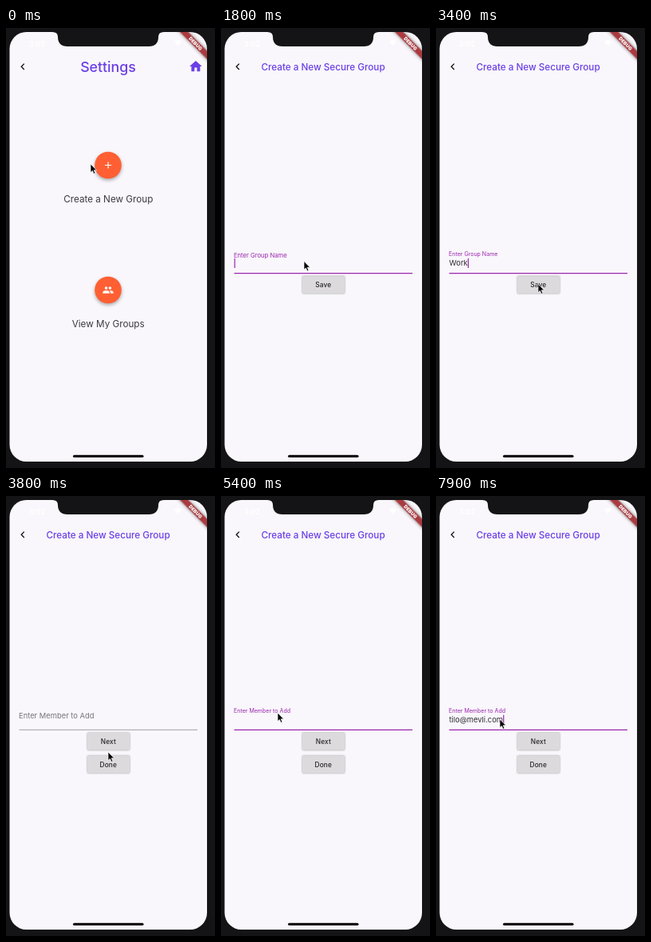
An HTML page that plays this animation: 262x550 px, repeating every 8 s.

```html
<!DOCTYPE html>
<html lang="en">
<head>
<meta charset="utf-8">
<title>Create a group</title>
<style>
html, body { margin: 0; width: 100%; height: 100%; overflow: hidden; background: #141315; }
svg { display: block; width: 100vw; height: 100vh; font-family: Inter, Roboto, sans-serif; }
text { white-space: pre; }
.mid { text-anchor: middle; }
.title { fill: #6b3fe6; font-weight: 500; }
.big { font-size: 17.8px; }
.small { font-size: 11.7px; }
.item { fill: #3d3b41; font-size: 11.7px; }
.label, .typed { font-size: 9.4px; }
.typed { fill: #2e2c31; }
.btn rect { fill: #dcdadd; filter: drop-shadow(0 .9px .8px #0006); }
.btn text { fill: #252428; font-size: 8.3px; font-weight: 500; letter-spacing: .15px; }
.fab { fill: #ff5f33; filter: drop-shadow(0 2px 2px #0005); }
.ribbon { filter: drop-shadow(0 0 2px #0008); }
</style>
</head>
<body>
<svg viewBox="0 0 262 550" preserveAspectRatio="none">
  <defs>
    <clipPath id="screen"><rect x="4.5" y="5" width="247.5" height="537" rx="21"/></clipPath>
  </defs>
  <rect width="262" height="550" fill="#141315"/>
  <g clip-path="url(#screen)">
    <rect width="262" height="550" fill="#f9f7fb"/>
    <text x="29" y="22.5" font-size="9" font-weight="600" fill="#fff">3:02</text>
    <path d="M211 17q4.500-4 9 0l-4.500 5z" fill="#fff"/>

    <g id="home">
      <text class="mid title big" x="128" y="55">Settings</text>
      <path fill="#6b3fe6" transform="translate(228.500 38.700) scale(.78)" d="M10 20v-6h4v6h5v-8h3L12 3 2 12h3v8z"/>
      <circle class="fab" cx="128" cy="171.500" r="16.800"/>
      <circle id="splash" cx="128" cy="171.500" r="16.800" fill="#fff"/>
      <path d="M124 171.500h8.200M128.100 167.400v8.200" stroke="#fff" stroke-width="1.200"/>
      <text class="mid item" x="128.300" y="217.500">Create a New Group</text>
      <circle class="fab" cx="128" cy="327.500" r="16.800"/>
      <path fill="#fff" transform="translate(120.800 320.300) scale(.6)" d="M16 11a3 3 0 1 0 0-6 3 3 0 0 0 0 6zM8 11a3 3 0 1 0 0-6 3 3 0 0 0 0 6zm0 2c-2.330 0-7 1.170-7 3.500V19h14v-2.500c0-2.330-4.670-3.500-7-3.500zm8 0c-.3 0-.6 0-1 .05 1.160.84 2 2 2 3.450V19h6v-2.500c0-2.330-4.670-3.500-7-3.500z"/>
      <text class="mid item" x="128.200" y="373.500">View My Groups</text>
    </g>

    <text id="title" class="mid title small" x="128" y="52.500">Create a New Secure Group</text>
    <g id="group">
      <g class="btn"><rect x="102" y="310.300" width="53" height="21.500" rx="1.300"/><text class="mid" x="128.300" y="324">Save</text></g>
      <rect id="press" x="102" y="310.300" width="53" height="21.500" rx="1.300" fill="#000"/>
    </g>
    <g id="member">
      <g class="btn"><rect x="102" y="296" width="53" height="21.500" rx="1.300"/><text class="mid" x="128.300" y="309.700">Next</text></g>
      <g class="btn"><rect x="102" y="324.800" width="53" height="21.500" rx="1.300"/><text class="mid" x="128.300" y="338.500">Done</text></g>
    </g>

    <path d="M22.800 44.600l-3.600 3.700 3.600 3.700" fill="none" stroke="#111" stroke-width="1.300"/>
    <g transform="translate(237.600 19.400) rotate(45)">
      <rect class="ribbon" x="-30" y="-3.600" width="60" height="7.200" fill="#a93a3f"/>
      <text class="mid" y="2.200" font-size="6" font-weight="900" fill="#fff">DEBUG</text>
    </g>
  </g>
  <path d="M58 0v5q7 0 7 6q0 12 12 12h102q12 0 12-12q0-6 7-6V0z" fill="#141315"/>
  <rect x="84" y="533.800" width="88.500" height="3" rx="1.500" fill="#000"/>
  <path id="mouse" d="M0 0v10.600l2.400-2.200 1.700 3.900 1.800-.8-1.700-3.700h3.400z" fill="#000" stroke="#fff" stroke-width=".7"/>
</svg>
<script>
const LOOP = 8000, STEP = 100;
const PURPLE = '#9c27b0';
const $ = id => document.getElementById(id);
const clamp = v => Math.min(1, Math.max(0, v));
const mix = (a, b, p) => a + (b - a) * p;
const ease = p => p * p * (3 - 2 * p);

// time, x, y of the pointer tip
const path = [
  [0, 106, 170], [300, 128, 165], [1000, 128, 165], [1500, 104, 291.5],
  [2700, 104, 291.5], [3400, 128, 320], [3800, 128, 320], [4300, 71, 271],
  [7800, 71, 271], [7900, 80, 279]
];

function pointer(t) {
  const i = path.findIndex(k => k[0] > t);
  if (i < 0) return path[path.length - 1].slice(1);
  const [a, b] = [path[i - 1], path[i]];
  const p = ease((t - a[0]) / (b[0] - a[0]));
  return [mix(a[1], b[1], p), mix(a[2], b[2], p)];
}

function add(parent, tag, attrs, text = '') {
  const el = document.createElementNS('http://www.w3.org/2000/svg', tag);
  for (const k in attrs) el.setAttribute(k, attrs[k]);
  el.textContent = text;
  return parent.appendChild(el);
}

// A text field whose underline lies at y; keys holds the time of each letter
function makeField(parent, y, name, value, focus, keys, caretAlpha) {
  const line = add(parent, 'path', { d: `M16.5 ${y}H240` });
  const label = add(parent, 'text', { class: 'label' }, name);
  const typed = add(parent, 'text', { class: 'typed', x: 16.5, y: y - 9.5 });
  const caret = add(parent, 'rect', { y: y - 18.6, width: 1.2, height: 12, fill: PURPLE });
  return t => {
    const on = t >= focus;
    const p = ease(clamp((t - focus + STEP) / 300));
    line.setAttribute('stroke', on ? PURPLE : '#8d8b90');
    line.setAttribute('stroke-width', on ? 1.3 : .8);
    label.setAttribute('fill', on ? PURPLE : '#77757a');
    label.setAttribute('transform',
      `translate(16 ${mix(y - 14.2, y - 21.3, p)}) scale(${mix(1, .75, p)})`);
    const text = value.slice(0, keys.filter(k => k <= t).length);
    if (typed.textContent !== text) typed.textContent = text;
    caret.setAttribute('x', 16.6 + (text ? typed.getComputedTextLength() : 0));
    caret.setAttribute('opacity', t > focus ? caretAlpha(t) : 0);
  };
}

const groupField = makeField($('group'), 306.6, 'Enter Group Name', 'Work',
  1700, [2200, 2400, 2600, 2800], () => 1);
const memberField = makeField($('member'), 292.3, 'Enter Member to Add', 'tilo@mevli.com',
  4400, [5700, 5800, 5900, 6000, 6100, 6400, 6500, 6600, 6700, 6900, 7000, 7200, 7300, 7400],
  t => t >= 5600 ? 1 : clamp((5400 - t) / 300));

const show = (id, on) => $(id).setAttribute('visibility', on ? 'visible' : 'hidden');

function draw(t) {
  show('home', t < 900);
  show('title', t >= 900);
  show('group', t >= 900 && t < 3600);
  show('member', t >= 3600);
  $('splash').setAttribute('opacity', t >= 300 ? .1 : 0);
  $('press').setAttribute('opacity', t >= 3500 ? .08 : 0);
  groupField(t);
  memberField(t);
  $('mouse').setAttribute('transform', `translate(${pointer(t)})`);
}

let start;
function tick(now) {
  start ??= now;
  draw(Math.floor((now - start) % LOOP / STEP) * STEP);
  requestAnimationFrame(tick);
}
draw(0);
requestAnimationFrame(tick);
</script>
</body>
</html>
```
